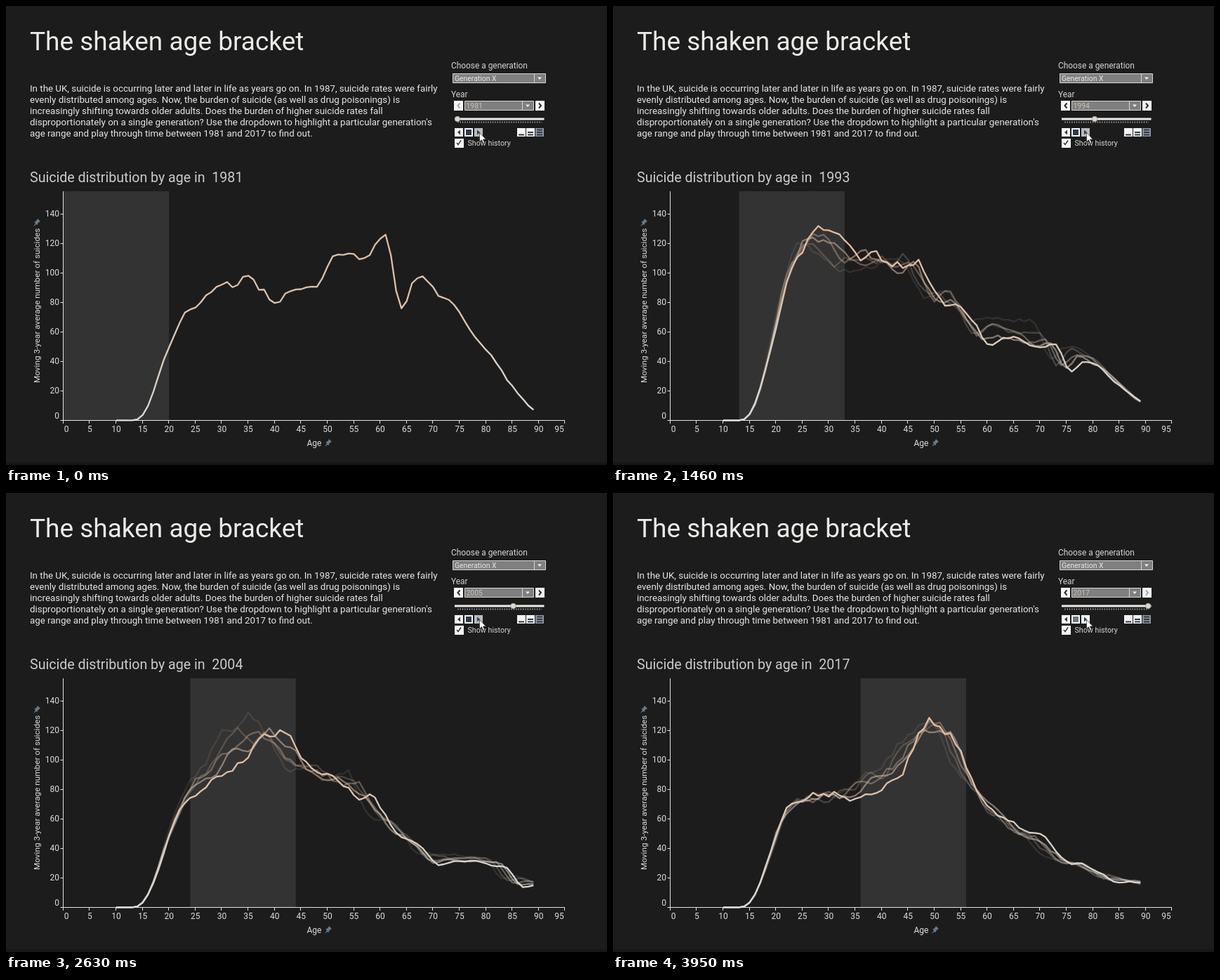
An HTML page that plays this animation: 856 px wide and 654 px high, repeating every 4.11 s.

```html
<!DOCTYPE html>
<html lang="en">
<head>
<meta charset="utf-8">
<title>The shaken age bracket</title>
<style>
  html, body { margin: 0; width: 100%; height: 100%; overflow: hidden; background: #1c1c1c; }
  svg { display: block; font-family: Roboto, sans-serif; }
  text { white-space: pre; }
</style>
</head>
<body>
<svg width="856" height="654" viewBox="0 0 856 654">
  <defs>
    <linearGradient id="tone" gradientUnits="userSpaceOnUse" x1="0" y1="590" x2="0" y2="290">
      <stop offset="0" stop-color="#d9d8d4"/>
      <stop offset=".25" stop-color="#dbd0c5"/>
      <stop offset=".6" stop-color="#dcc0a9"/>
      <stop offset="1" stop-color="#e0b99b"/>
    </linearGradient>
    <path id="pin" d="M1-5 5-1 3 0 1 2 1 4-1 3-5 6-2 1-4-1-2-1 0-3Z" fill="#66798c"/>
  </defs>
  <rect y="650" width="856" height="4" fill="#161616"/>
  <text x="34" y="62.5" font-size="37" fill="#ebebe8">The shaken age bracket</text>
  <g id="intro" font-size="13.33" fill="#e6e6e6"></g>
  <text id="heading" x="34" y="251" font-size="19.6" fill="#cbcbcb"></text>

  <rect id="band" y="264" width="150.4" height="326" fill="#333"/>
  <g id="lines" fill="none" stroke="url(#tone)" stroke-width="2.3" stroke-linejoin="round"></g>
  <path id="axes" fill="none" stroke="#e2e2e2"/>
  <g id="labels" font-size="12" fill="#dcdcdc"></g>
  <text x="439" y="627" font-size="12" fill="#dcdcdc" text-anchor="middle">Age</text>
  <text transform="translate(48 537) rotate(-90)" font-size="11.75" fill="#dcdcdc">Moving 3-year average number of suicides</text>
  <use href="#pin" x="44" y="308"/>
  <use href="#pin" x="459" y="622"/>

  <g font-size="11.9" fill="#d4d4d4">
    <text x="634" y="89">Choose a generation</text>
    <text x="634" y="130">Year</text>
    <text x="657.5" y="199" font-size="10.7">Show history</text>
  </g>
  <g fill="#7f7f7f" stroke="#d6d6d6">
    <path d="M636.5 96.5h132v13h-132ZM752.5 96.5v13"/>
    <path d="M653.5 135.5h98v13h-98ZM735.5 135.5v13"/>
  </g>
  <path d="M757 101.5h6l-3 3.5ZM740 140.5h6l-3 3.5Z" fill="#f2f2f2"/>
  <text x="639" y="106.5" font-size="10.4" fill="#e6e6e6">Generation X</text>
  <text id="year" x="655.5" y="145.5" font-size="10.4" fill="#cdc3b6"></text>

  <path d="M638 135h13v14h-13ZM754 135h13v14h-13ZM639 174h12v12h-12ZM653 174h12v12h-12ZM728 174h12v12h-12ZM741 174h12v12h-12ZM639 189h13v13h-13Z" fill="#f5f5f5"/>
  <rect id="playBox" x="667" y="174" width="12" height="12"/>
  <rect x="754" y="174" width="12" height="12" fill="#8d9299"/>
  <rect x="639" y="159.5" width="127.5" height="3" fill="#efece9"/>
  <g fill="none" stroke-width="2">
    <path id="prev" d="M646.5 138.5l-3 3.5 3 3.5"/>
    <path id="next" d="M759 138.5l3 3.5-3 3.5"/>
    <path d="M642 195l2 2.5 4-6" stroke="#333" stroke-width="1.4"/>
    <path d="M643.5 165.5H763" stroke="#cfcfcf" stroke-dasharray="1 2.31"/>
  </g>
  <g fill="#2d3b4e">
    <path d="M647 176.5v7l-4-3.5Z"/>
    <path id="stop" d="M655 176h8v8h-8Z"/>
    <path d="M671 176.5v7l4-3.5Z"/>
    <path d="M730 182.5h8v2h-8ZM743 179h8v2h-8ZM743 182.5h8v2h-8ZM756 175.5h8v2h-8ZM756 179h8v2h-8ZM756 182.5h8v2h-8Z"/>
  </g>
  <circle id="knob" cy="161" r="3.8" fill="#ddd7d1" stroke="#9b948d" stroke-width=".7"/>
  <path d="M674.5 180.5v13l3-2.7 2 4.7 2-1-2-4.5h4Z" fill="#fff" stroke="#111" stroke-width=".6"/>
</svg>
<script>
const $ = id => document.getElementById(id);
const FIRST = 1981, SPAN = 36;
const LOOP = 4110, YEAR_MS = 109, LEAD_IN = 70, REFRESH = 77.5;
const px = age => 81.8 + age * 7.522;
const py = count => 590.3 - count * 2.104;
const clamp = (v, lo, hi) => Math.min(hi, Math.max(lo, v));
const mix = (a, b, u) => a + (b - a) * u;

function add(parent, tag, attrs, text = '') {
  const node = document.createElementNS('http://www.w3.org/2000/svg', tag);
  for (const key in attrs) node.setAttribute(key, attrs[key]);
  node.textContent = text;
  return parent.appendChild(node);
}

// Broad shape of some years: level at ages 20, 30 ... 90.
const profiles = {
  1981: [66, 92, 89, 106, 110, 92, 47, 5],
  1986: [95, 86, 93, 92, 88, 80, 43, 10],
  1990: [95, 100, 108, 90, 65, 55, 41, 11],
  1997: [98, 118, 105, 90, 59, 42, 36, 12],
  2001: [76, 98, 92, 89, 64, 37, 31, 16],
  2008: [73, 76, 104, 89, 65, 33, 28, 14],
  2017: [76, 76, 82, 103, 68, 44, 25, 16]
};
const profileYears = Object.keys(profiles).map(Number);

// Generations that stand out at every age: birth year, effect, spread in years.
const cohorts = [
  { born: 1917, effect: -.28, spread: 1.8 },
  { born: 1920, effect: .12, spread: 1.5 },
  { born: 1933, effect: -.15, spread: 2 },
  { born: 1941, effect: -.08, spread: 1.5 },
  { born: 1946, effect: .09, spread: 1.6 },
  { born: 1964, effect: .25, spread: 5 },
  { born: 1970, effect: .08, spread: 2.5 }
];

// Catmull-Rom through the ten-year levels.
function level(knots, age) {
  const x = clamp((age - 20) / 10, 0, 6.999), i = Math.floor(x), u = x - i;
  const [a, b, c, d] = [-1, 0, 1, 2].map(k => knots[clamp(i + k, 0, 7)]);
  return b + u / 2 * (c - a + u * (2 * a - 5 * b + 4 * c - d + u * (3 * (b - c) + d - a)));
}

function random(year, age) {
  const v = Math.sin(year * 12.9898 + age * 78.233) * 43758.5453;
  return v - Math.floor(v) - .5;
}

const wobble = (year, age) =>
  .17 * (random(year, age - 1) + random(year, age) + random(year, age + 1)) / 3;

function countAt(year, age) {
  const n = Math.max(1, profileYears.findIndex(y => y >= year));
  const [y0, y1] = profileYears.slice(n - 1, n + 1);
  const base = mix(level(profiles[y0], age), level(profiles[y1], age), (year - y0) / (y1 - y0));
  const rise = 1 - Math.exp(-((Math.max(0, age - 13) / 7) ** 2.5));
  const generation = cohorts.reduce((product, { born, effect, spread }) =>
    product * (1 + effect * Math.exp(-(((year - age - born) / spread) ** 2))), 1);
  return base * rise * generation * (1 + wobble(year, age));
}

const paths = Array.from({ length: SPAN + 1 }, (_, i) =>
  'M' + Array.from({ length: 80 }, (_, k) =>
    px(10 + k).toFixed(1) + ' ' + py(countAt(FIRST + i, 10 + k)).toFixed(1)).join('L'));

[
  'In the UK, suicide is occurring later and later in life as years go on. In 1987, suicide rates were fairly',
  'evenly distributed among ages. Now, the burden of suicide (as well as drug poisonings) is',
  'increasingly shifting towards older adults. Does the burden of higher suicide rates fall',
  "disproportionately on a single generation? Use the dropdown to highlight a particular generation's",
  'age range and play through time between 1981 and 2017 to find out.'
].forEach((line, i) => add($('intro'), 'text', { x: 34, y: 122 + i * 16 }, line));

let axes = 'M81.5 264V590.5H796';
for (let age = 0; age <= 95; age += 5) {
  axes += `M${Math.round(px(age)) - .5} 590v5`;
  add($('labels'), 'text', { x: clamp(px(age), 86, 788), y: 607, 'text-anchor': 'middle' }, age);
}
for (let count = 0; count <= 140; count += 20) {
  axes += `M77.5 ${Math.round(py(count)) + .5}h4`;
  add($('labels'), 'text', { x: 76, y: Math.min(py(count) + 4, 587.5), 'text-anchor': 'end' }, count);
}
$('axes').setAttribute('d', axes);

// Faintest first, so that the current year lies on top.
const traces = [.12, .23, .37, .53, 1].map(opacity => add($('lines'), 'path', { opacity }));

function render(time) {
  const t = time < LEAD_IN ? 0
    : LEAD_IN + REFRESH * Math.floor((time - LEAD_IN + .01) / REFRESH);
  // The picker runs ahead of the chart, which needs a moment to load.
  const picked = clamp(Math.floor((t + 85) / YEAR_MS), 0, SPAN);
  const shown = clamp(Math.floor((t - 13) / YEAR_MS), 0, SPAN);
  const playing = shown < SPAN;

  $('heading').textContent = `Suicide distribution by age in  ${FIRST + shown}`;
  $('year').textContent = FIRST + picked;
  $('band').setAttribute('x', px(picked));
  $('knob').setAttribute('cx', 643 + picked * 3.31);
  $('prev').setAttribute('stroke', picked ? '#2b2b2b' : '#aaa');
  $('next').setAttribute('stroke', picked < SPAN ? '#2b2b2b' : '#aaa');
  $('playBox').setAttribute('fill', playing ? '#b9bbbd' : '#f5f5f5');
  $('stop').setAttribute('fill', playing ? '#2d3b4e' : '#6f7680');
  traces.forEach((node, i) => node.setAttribute('d', paths[shown - 4 + i] || ''));
}

function loop() {
  render(performance.now() % LOOP);
  requestAnimationFrame(loop);
}
loop();
</script>
</body>
</html>
```
